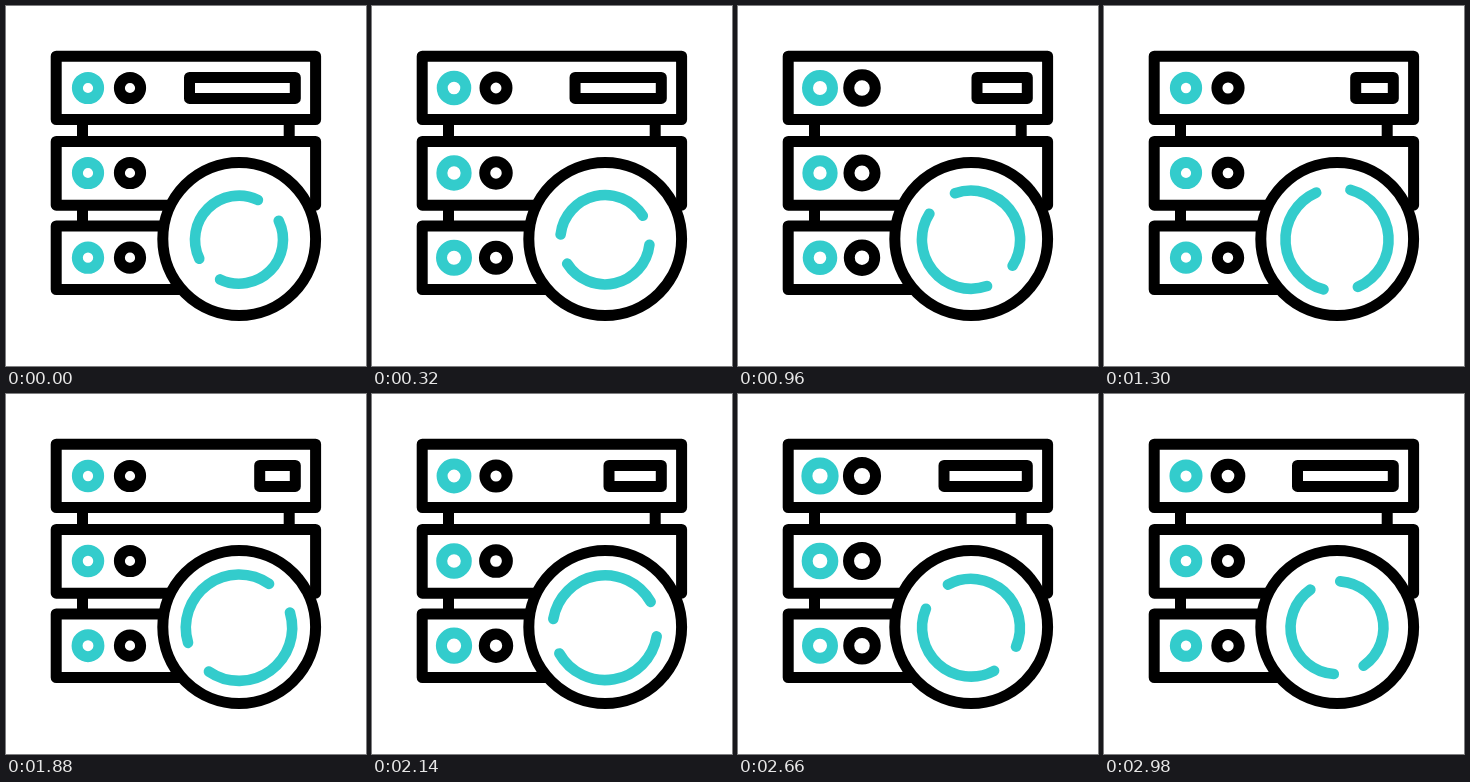
Recreate the animation shown at these times as an HTML page. Size 360 by 360 pixels, loop 3000 ms.

```html
<!DOCTYPE html>
<html lang="en">
<head>
<meta charset="utf-8">
<title>Server refresh</title>
<style>
  html, body { margin: 0; width: 100%; height: 100%; overflow: hidden; background: #fff; }
  svg { display: block; width: 100%; height: 100%; }
  #icon { fill: none; stroke: #000; stroke-width: 11; stroke-linejoin: round; }
  #icon .teal { stroke: #33cccc; }
  #arcs { stroke-width: 10.6; stroke-linecap: round; }
</style>
</head>
<body>
<svg viewBox="0 0 360 360">
  <g id="icon">
    <path d="M76.5 113V136M283.2 113V136M76.5 199V220"/>
    <path d="M50.2 50.2H309.6V113.6H50.2ZM50.2 135.5H309.6V199.2H50.2ZM180 220H50.2V283.6H180"/>
    <path id="bar"/>
    <g id="dots"></g>
    <circle cx="233.2" cy="233" r="76.4" fill="#fff"/>
    <path id="arcs" class="teal"/>
  </g>
</svg>
<script>
  const LOOP = 3000, STEP = 20;
  const ARC_CYCLE = 3600, ARC_SPAN = 141, ARC_X = 233, ARC_Y = 233.7;
  const PULSE_CYCLE = 1800, PULSE_LENGTH = 1300;
  const bar = document.getElementById('bar');
  const arcs = document.getElementById('arcs');
  const dotGroup = document.getElementById('dots');

  // Left edge of the bar: [time, x]; the first and last keys only shape the slope.
  const BAR_KEYS = [[-300, 176], [0, 183.5], [620, 221.7], [1300, 251.7], [1880, 253.7],
                    [2140, 237], [2660, 206], [2980, 193.5], [3600, 183.5], [3900, 176]];

  const wave = p => (1 - Math.cos(2 * Math.PI * p)) / 2;

  function smoothKeys(keys, t) {
    let i = 1;
    while (t >= keys[i + 1][0]) i++;
    const slope = k => (keys[k + 1][1] - keys[k - 1][1]) / (keys[k + 1][0] - keys[k - 1][0]);
    const [t0, a] = keys[i], [t1, b] = keys[i + 1];
    const d = t1 - t0, u = (t - t0) / d, v = 1 - u;
    return a * v * v * (1 + 2 * u) + b * u * u * (1 + 2 * v)
      + d * u * v * (slope(i) * v - slope(i + 1) * u);
  }

  // A dot swells once, then rests until the cycle ends.
  function pulse(t) {
    const phase = (t + PULSE_CYCLE) % PULSE_CYCLE;
    return phase < PULSE_LENGTH ? wave(phase / PULSE_LENGTH) : 0;
  }

  const dots = [];
  [82, 167, 251.7].forEach((y, row) => {
    [82, 124].forEach((x, column) => {
      const el = document.createElementNS('http://www.w3.org/2000/svg', 'circle');
      el.setAttribute('cx', x);
      el.setAttribute('cy', y);
      if (column === 0) el.setAttribute('class', 'teal');
      dotGroup.append(el);
      dots.push({ el, delay: 40 + column * 130 - row * 50 });
    });
  });

  function arcPath(middle, r) {
    const point = deg => {
      const a = deg * Math.PI / 180;
      return `${ARC_X + r * Math.cos(a)} ${ARC_Y + r * Math.sin(a)}`;
    };
    return `M${point(middle - ARC_SPAN / 2)}A${r} ${r} 0 0 1 ${point(middle + ARC_SPAN / 2)}`;
  }

  function render(t) {
    const left = smoothKeys(BAR_KEYS, t);
    bar.setAttribute('d', `M${left} 71.5H289.3V92.4H${left}Z`);
    for (const { el, delay } of dots) el.setAttribute('r', 10.6 + 3 * pulse(t - delay));
    const angle = 45 + t * 0.1005;
    const radius = 44 + 9.2 * wave(t / ARC_CYCLE);
    arcs.setAttribute('d', arcPath(angle, radius) + arcPath(angle + 180, radius));
  }

  const start = performance.now();
  function tick() {
    const t = (performance.now() - start) % LOOP;
    render(Math.floor(t / STEP) * STEP);
    requestAnimationFrame(tick);
  }
  tick();
</script>
</body>
</html>
```
